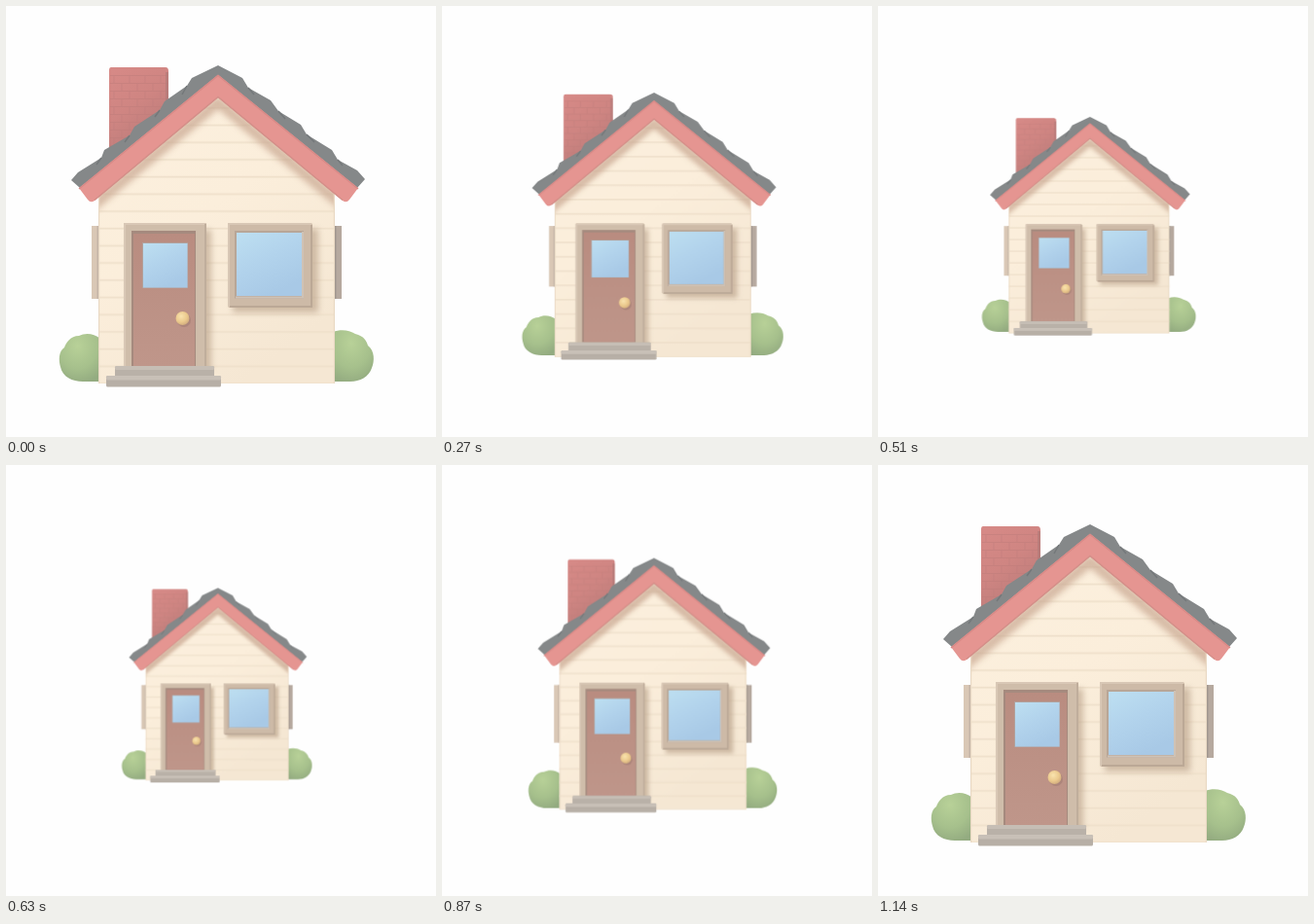
These frames come from a looping animation (442x443 px, 1210 ms). An HTML page:

```html
<!DOCTYPE html>
<html lang="en">
<head>
<meta charset="utf-8">
<title>House</title>
<style>
  html, body { margin: 0; width: 100%; height: 100%; overflow: hidden; background: #fefefe; }
  svg { display: block; width: 100%; height: 100%; }
  #house { transform-origin: 217.6px 226.5px; }
</style>
</head>
<body>
<svg viewBox="0 0 442 443">
  <defs>
    <linearGradient id="wall" x2=".6" y2="1">
      <stop offset="0" stop-color="#fcf0de"/><stop offset=".5" stop-color="#fbeedb"/><stop offset="1" stop-color="#f5e7d3"/>
    </linearGradient>
    <linearGradient id="pane" x2=".5" y2="1">
      <stop offset="0" stop-color="#bddff1"/><stop offset=".5" stop-color="#b2d3ec"/><stop offset="1" stop-color="#a8c9e6"/>
    </linearGradient>
    <linearGradient id="brick" x2=".5" y2="1">
      <stop offset="0" stop-color="#d78a87"/><stop offset=".5" stop-color="#cf8582"/><stop offset="1" stop-color="#b97b79"/>
    </linearGradient>
    <linearGradient id="door" x2="0" y2="1">
      <stop offset="0" stop-color="#b98c80"/><stop offset="1" stop-color="#bf968a"/>
    </linearGradient>
    <radialGradient id="leaf" cx=".45" cy=".25" r=".8">
      <stop offset="0" stop-color="#b8d198"/><stop offset=".6" stop-color="#a6c08c"/><stop offset="1" stop-color="#93ab80"/>
    </radialGradient>
    <radialGradient id="brass" cx=".4" cy=".35" r=".7">
      <stop offset="0" stop-color="#f9e3ae"/><stop offset=".6" stop-color="#ebc98d"/><stop offset="1" stop-color="#cfa97c"/>
    </radialGradient>
    <pattern id="boards" width="20" height="17.7" y="88.4" patternUnits="userSpaceOnUse">
      <path d="M0 16.4H20" stroke="#efe0cb" stroke-width="1.8"/>
    </pattern>
    <pattern id="bricks" x="107" y="71" width="16" height="16" patternUnits="userSpaceOnUse">
      <path d="M0 .5H16M0 8.5H16M4 0V8M12 8V16" stroke="#bd7c79" stroke-width="1" opacity=".5"/>
    </pattern>
    <path id="gable" d="M218 90 338 190V388H95V190Z"/>
    <clipPath id="face"><use href="#gable"/></clipPath>
    <filter id="soft" x="-30%" y="-30%" width="160%" height="160%"><feGaussianBlur stdDeviation="3"/></filter>
  </defs>

  <g id="house">
    <path d="M97 342C90 336 81 336 75 339 66 339 62 346 60 351 54 355 54 364 56 371 58 381 68 386 79 386H97Z" fill="url(#leaf)"/>
    <path d="M336 335C344 332 353 333 359 337 368 339 371 345 372 349 379 354 379 365 376 372 373 381 364 386 354 386H336Z" fill="url(#leaf)"/>
    <path d="M88 226H96V301H88Z" fill="#d9c7b5"/>
    <path d="M94.500 226V301" stroke="#c4b5a7" stroke-width="2"/>
    <path d="M337 226H345V301H337Z" fill="#b6a99f"/>
    <path d="M338.500 226V301" stroke="#a1978f" stroke-width="2"/>

    <path d="M108 63H164Q167 63 167 67V125L106 155V66Q106 63 108 63Z" fill="url(#brick)"/>
    <path d="M107 71H166V125L107 155Z" fill="url(#bricks)"/>
    <path d="M165.500 68V125" stroke="#b37a78" stroke-width="3" opacity=".7"/>

    <use href="#gable" fill="url(#wall)"/>
    <use href="#gable" fill="url(#boards)"/>
    <g clip-path="url(#face)">
      <path d="M80 213 218 99 356 213" fill="none" stroke="#c7a58f" stroke-width="11" opacity=".7" filter="url(#soft)"/>
      <path d="M95.500 190V388M337.500 190V388" stroke="#e9d9c4" stroke-width="1.500"/>
      <g fill="#b49b83" opacity=".6" filter="url(#soft)">
        <rect x="126" y="230" width="85" height="146"/>
        <rect x="233" y="229" width="88" height="86"/>
      </g>
    </g>

    <path fill="#858889" d="M218 61 243 74 249 84 272 97 280 108 303 122 309 132 335 148 341 158 361 169 369 178 361 187 218 76 76 187 67 179 74 171 98 156 101 148 127 133 132 124 158 107 163 98 186 82 191 74Z"/>
    <path d="M249 84 255 91M280 108 287 116M309 132 317 140M341 158 346 164M186 82 181 91M158 107 153 114M127 133 122 140M98 156 93 163" stroke="#74787a" stroke-width="1.500"/>
    <path id="trim" d="M218 70.500 362 187 353 199Q350 203 346 200L218 94 91 200Q87 203 84 199L75 187Z" fill="#e59591"/>
    <path d="M218 71.500 362 188M218 71.500 75 188" stroke="#d98a87" stroke-width="1.500"/>
    <path d="M91 199.500 218 93.500 346 199.500" fill="none" stroke="#d48f89" stroke-width="1.500"/>

    <rect x="121" y="223" width="85" height="149" rx="1" fill="#cfbdaa"/>
    <path d="M122 372V224H205" fill="none" stroke="#d9c8b6" stroke-width="2"/>
    <path d="M205 224V372" stroke="#c0ae9c" stroke-width="2"/>
    <rect x="129" y="231" width="66" height="139" fill="#a58a7e"/>
    <rect x="131" y="234" width="63" height="136" fill="url(#door)"/>
    <rect x="140" y="243" width="47" height="47" fill="#b2a09b"/>
    <rect x="141" y="244" width="45.500" height="45.500" fill="url(#pane)"/>
    <circle cx="183" cy="323" r="7" fill="#94706a" opacity=".4"/>
    <circle cx="181.500" cy="321" r="7" fill="url(#brass)"/>

    <rect x="228" y="223" width="87" height="87" rx="2" fill="#cdbaa7"/>
    <path d="M229 309V224H314" fill="none" stroke="#d8c7b5" stroke-width="2"/>
    <path d="M314 225V309H230" fill="none" stroke="#bba896" stroke-width="2"/>
    <rect x="235" y="231" width="71" height="69.500" fill="#b8a697"/>
    <path d="M236 299.500H305V232" fill="none" stroke="#cfc2b5" stroke-width="2"/>
    <rect x="237" y="233" width="67" height="65" fill="url(#pane)"/>

    <rect x="112" y="370" width="102" height="11" rx="1.500" fill="#b9b1a8"/>
    <rect x="112" y="370" width="102" height="4" rx="1.500" fill="#c6beb5"/>
    <rect x="103" y="380" width="118" height="11.500" rx="1.500" fill="#b7afa6"/>
    <rect x="103" y="380" width="118" height="4.500" rx="1.500" fill="#c8c0b7"/>
  </g>
</svg>
<script>
  const LOOP = 1210, LOW = 630, FULL = 1140, TICK = 30;
  const key = (time, scale, ticks) => ({
    offset: time / LOOP,
    transform: `scale(${scale})`,
    easing: ticks ? `steps(${ticks}, end)` : "linear"
  });

  // Shrink, grow back, then rest briefly at full size.
  document.getElementById("house").animate([
    key(0, 1, LOW / TICK),
    key(LOW, 0.605, (FULL - LOW) / TICK),
    key(FULL, 1),
    key(LOOP, 1)
  ], { duration: LOOP, iterations: Infinity });
</script>
</body>
</html>
```
